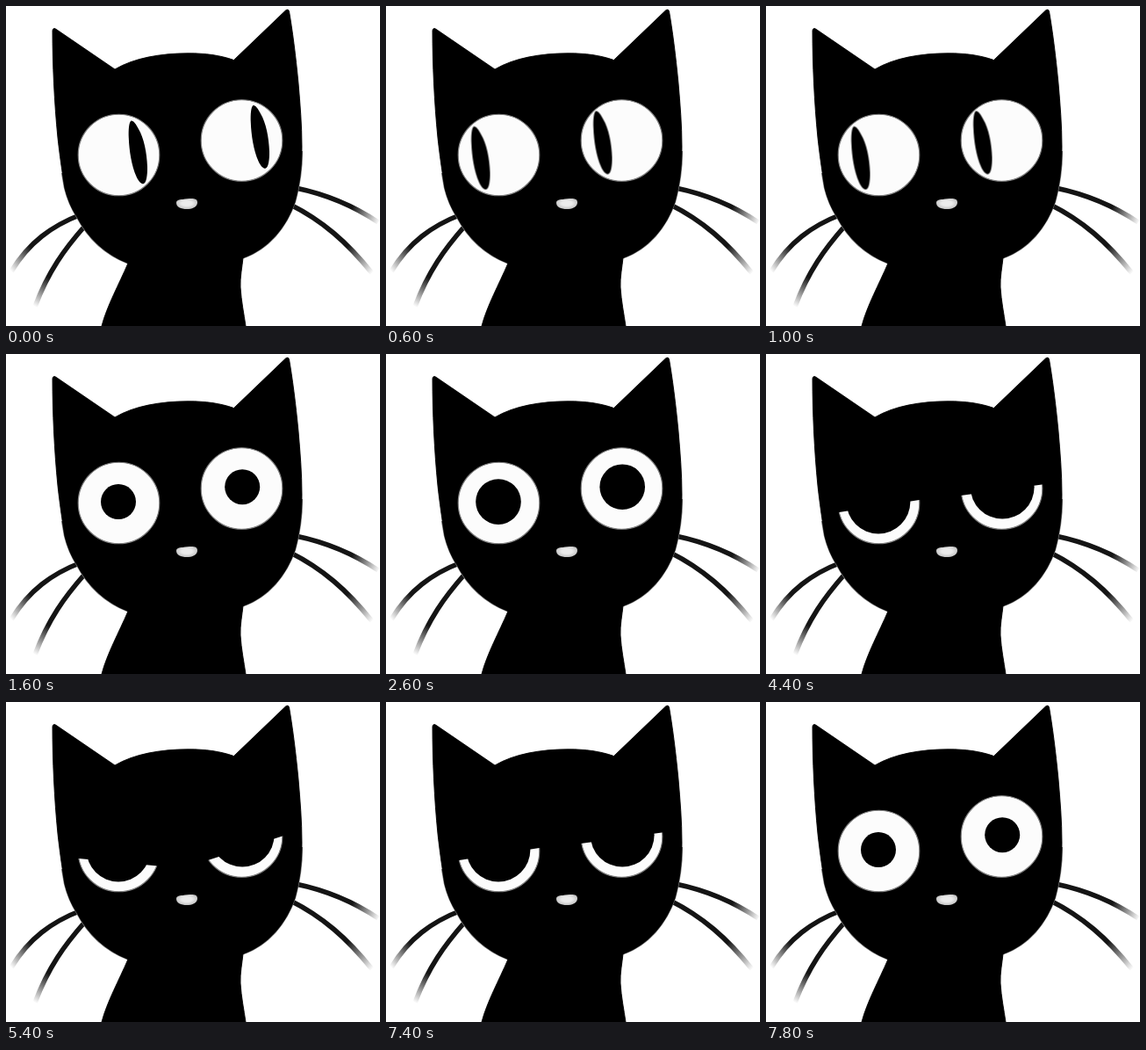
Write an HTML page that moves like this. It is 426 px wide and 364 px high and loops after 7900 ms.

```html
<!DOCTYPE html>
<html lang="en">
<head>
<meta charset="utf-8">
<title>Black cat</title>
<style>
  html, body { margin: 0; width: 100%; height: 100%; overflow: hidden; background: #fff; }
  svg { display: block; width: 100vw; height: 100vh; }

  .slits, .pupils circle, .lids { animation: 7.9s step-end infinite; }
  .slits { animation-name: glance; }
  .pupils circle { animation-name: widen; }
  .sleepy { animation-name: sleepy; }
  .cross { animation-name: cross; }

  .body { stroke: #000; stroke-width: .9; stroke-linejoin: round; }
  .fur { fill: none; stroke: #777; stroke-width: 2.2; }
  .eyes { fill: #fcfcfc; stroke: #808080; stroke-width: 1.1; }
  .whiskers { fill: none; stroke-width: 5.6; }

  @keyframes glance {
    0%, 5.0632%, 10.1265%, 15.1898% { transform: none; opacity: 1; }
    2.5316%, 7.5949%, 12.6582%, 17.7215% { transform: translate(-42.5px, 6.5px); opacity: 1; }
    20.2531%, 100% { transform: none; opacity: 0; }
  }
  @keyframes widen {
    0%, 100% { r: 0; }
    20.2531%, 98.7341% { r: 20px; }
    32.9113%, 97.4683% { r: 25.8px; }
    35.4430%, 96.2025% { r: 31px; }
    36.7088% { r: 36.4px; }
  }
  @keyframes sleepy {
    0%, 68.3544%, 94.9367%, 100% { opacity: 0; }
    55.6962%, 93.6708% { opacity: 1; }
  }
  @keyframes cross {
    0%, 93.6708%, 100% { opacity: 0; }
    68.3544% { opacity: 1; }
  }
</style>
</head>
<body>
<svg viewBox="0 0 426 364" preserveAspectRatio="none">
  <defs>
    <linearGradient id="w1" gradientUnits="userSpaceOnUse" x1="82" y1="238" x2="6" y2="302">
      <stop offset=".65" stop-color="#141414"/><stop offset="1" stop-color="#141414" stop-opacity="0"/>
    </linearGradient>
    <linearGradient id="w2" href="#w1" x1="88" y1="253" x2="33" y2="342"/>
    <linearGradient id="w3" href="#w1" x1="333" y1="207" x2="425" y2="246"/>
    <linearGradient id="w4" href="#w1" x1="327" y1="227" x2="417" y2="304"/>
    <radialGradient id="shine" cx=".5" cy=".45" r=".6">
      <stop offset=".4" stop-color="#ebebeb"/><stop offset="1" stop-color="#bcbcbc"/>
    </radialGradient>
    <path id="slit" d="M142.5 130.5C140 132 139.4 141 139.8 150C140.3 164 143 182 148.5 194C151 199.5 154 202.5 156.5 202.3C160 201.5 161.2 192 161 183C160.5 167 157 150 151 140C148 134 145 130 142.5 130.5Z"/>
  </defs>

  <g class="whiskers">
    <path stroke="url(#w1)" d="M86 237C52 250 26 269 6 302"/>
    <path stroke="url(#w2)" d="M90 250C67 276 48 302 33 342"/>
    <path stroke="url(#w3)" d="M330 207C364 214 394 226 424 246"/>
    <path stroke="url(#w4)" d="M324 226C360 244 388 268 417 304"/>
  </g>

  <path class="fur" d="M337 165C337 185 334 205 329 223C319 252 299 276 270 286.5M139 292.5C112 282 93 263 81 240C74 229 70 219 67 207L64 190"/>
  <path class="body" d="M53 28Q53.5 24.5 56.5 26L124 72C146 59 176 54 207 53.8C227 53.7 244 56 259.5 61.5L318.5 5Q321.5 2.5 322.5 6C326 26 330 56 333 88C335 112 337 135 337 160C337 185 334 205 329 223C319 252 299 276 270 286.5C269 297 266.5 308 267 320C268 336 271 350 273 364H109C115 341 129 316 139 292.5C112 282 93 263 81 240C74 229 70 219 67 207C64 190 61 168 59 150C55 110 53 65 53 28Z"/>

  <g class="eyes">
    <circle cx="128.5" cy="169.5" r="46.3"/>
    <circle cx="268.5" cy="153" r="46.3"/>
  </g>

  <g class="slits">
    <use href="#slit"/>
    <use href="#slit" x="139" y="-17.5"/>
  </g>
  <g class="pupils">
    <circle cx="128" cy="168.1" r="0"/>
    <circle cx="269.2" cy="151.2" r="0"/>
  </g>

  <path class="lids sleepy" d="M80 120H178V165.5L80 180.5ZM220 104H318V148L220 161.2Z"/>
  <path class="lids cross" d="M80 120H178V187L80 177.8ZM220 104H318V151.5L220 183.2Z"/>

  <path fill="url(#shine)" d="M194 224C194 221 197 220 201 220C206 219.5 210 218.8 214 219.2C217.5 219.5 218.5 222 217.8 225C216.5 229 212 231 206 231C199 231 194 228.5 194 224Z"/>
</svg>
</body>
</html>
```
